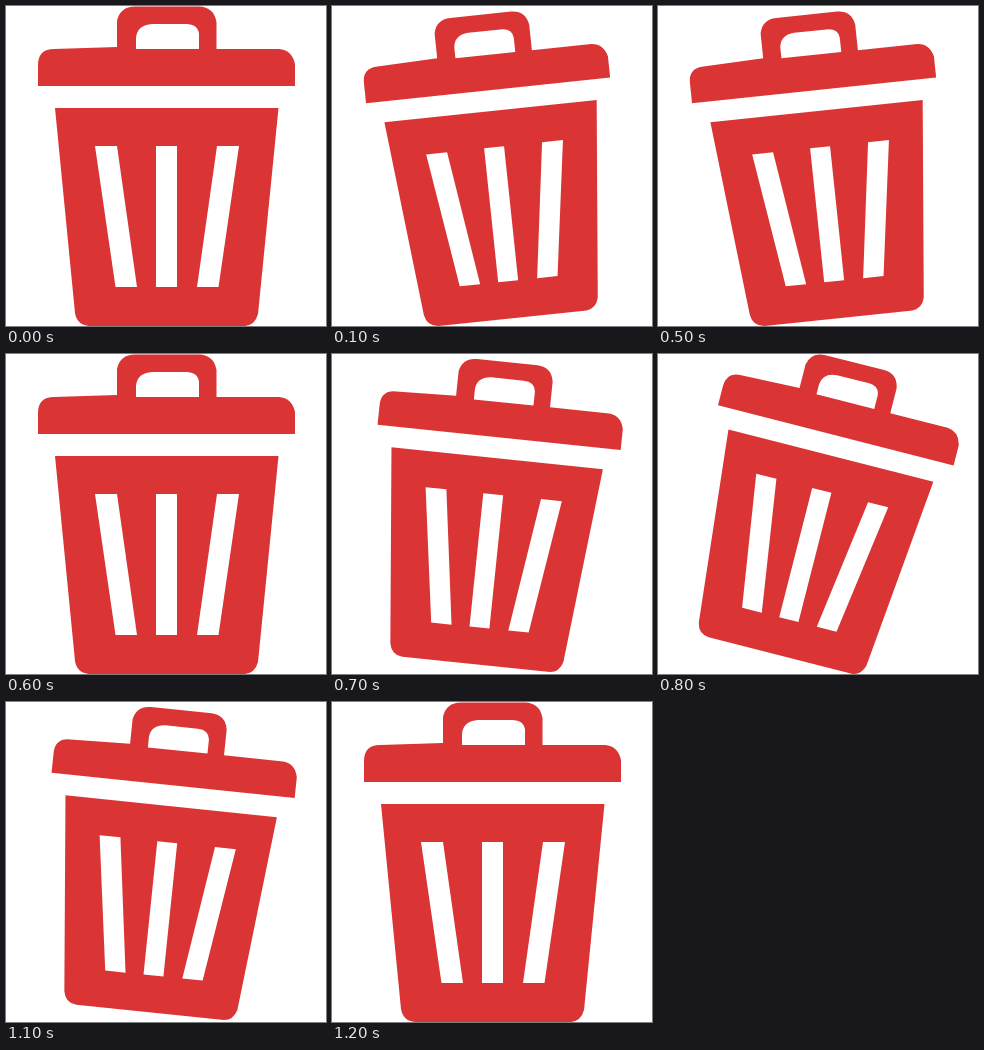
Recreate the animation shown at these times as an HTML page. Size 320 by 320 pixels, loop 1300 ms.

```html
<!DOCTYPE html>
<html lang="en">
<head>
<meta charset="utf-8">
<title>Rocking bin</title>
<style>
  html, body { margin: 0; width: 100%; height: 100%; overflow: hidden; background: #fff; }
  svg { display: block; width: 100%; height: 100%; }
</style>
</head>
<body>
<svg viewBox="0 0 320 320">
  <g id="bin" fill="#da3435" fill-rule="evenodd">
    <path d="M32 80V59Q32 43 48 43L111 41V15Q114 .5 129 .5H193Q208 1 210.5 16V43H273Q286 44 289 58V80Z
             M130 43H193V28Q192 18 180 18H146Q131 19 130 32Z"/>
    <path d="M49 102H272.5L252 308Q249 319 239 320H83Q71 319 69 307Z
             M89 140H111L131 281H109.5Z
             M150 140H171V281H150Z
             M211 140H233L212.5 281H191Z"/>
  </g>
</svg>
<script>
  const STEP = 100;
  const UPRIGHT = { x: 160.5, y: 80, angle: 0, scale: 1 };
  const pose = (x, y, angle, scale) => ({ x, y, angle, scale });

  // x, y: middle of the lid's lower edge
  const left = [
    pose(156.1, 84.3, -6, 0.955),
    pose(149.5, 82.7, -11.4, 0.943),
    pose(142.6, 81.4, -16.6, 0.93)
  ];
  const right = [
    pose(167.1, 83.4, 5.9, 0.951),
    pose(177.8, 81.4, 14.3, 0.946),
    pose(190, 82, 22, 0.93)
  ];
  const swing = ([a, b, c]) => [a, b, c, b, a, UPRIGHT];
  const poses = [UPRIGHT, ...swing(left), ...swing(right)];

  const bin = document.getElementById('bin');

  function draw(time) {
    const { x, y, angle, scale } = poses[Math.floor(time / STEP) % poses.length];
    bin.setAttribute('transform',
      `translate(${x} ${y}) rotate(${angle}) scale(${scale}) translate(${-UPRIGHT.x} ${-UPRIGHT.y})`);
  }

  const start = performance.now();
  function tick() {
    draw(performance.now() - start);
    requestAnimationFrame(tick);
  }
  tick();
</script>
</body>
</html>
```
